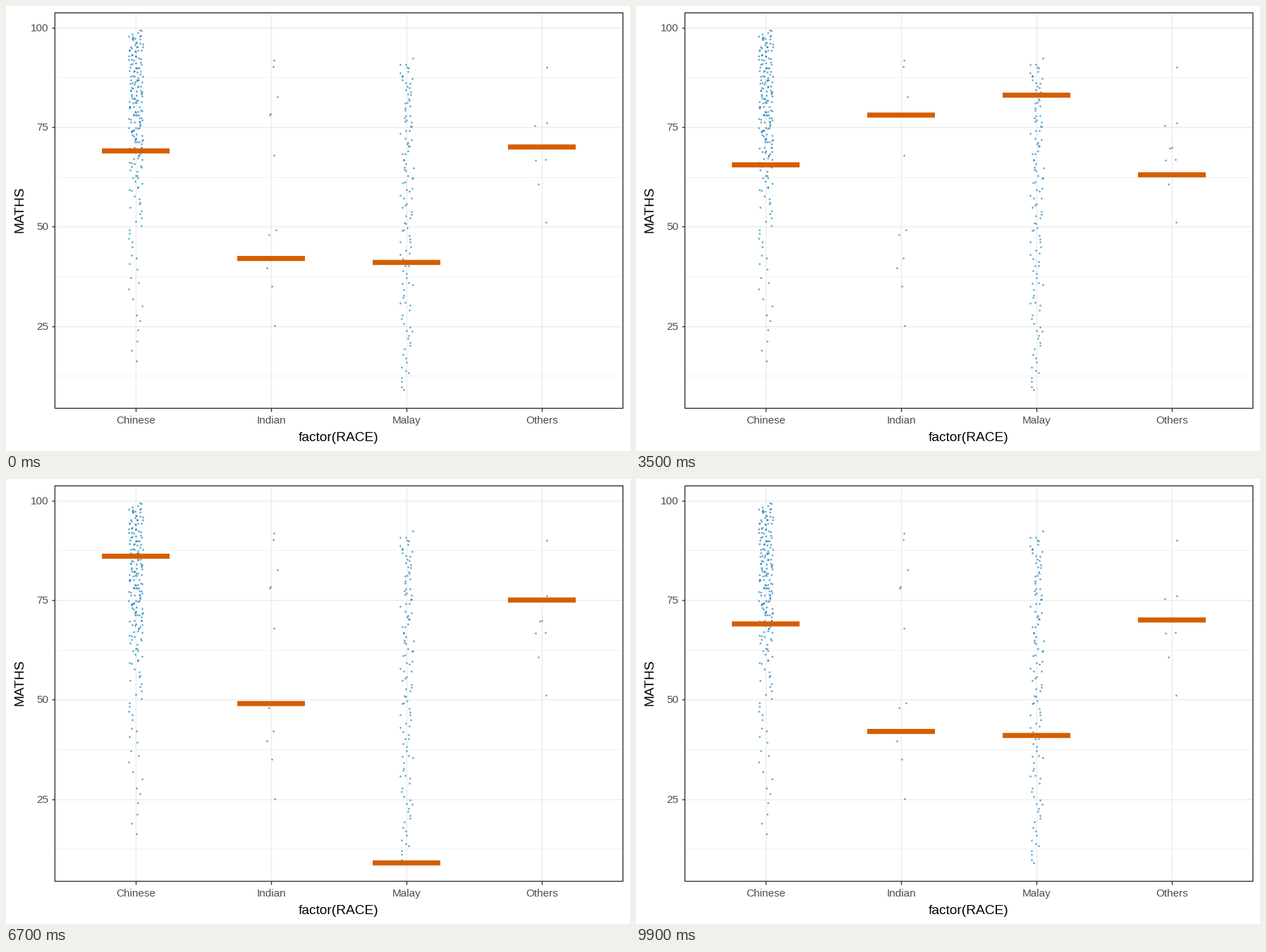
Animation of 885x632 px, one loop 10000 ms. Source, as a matplotlib script:

```python
import numpy as np
import matplotlib.pyplot as plt
from matplotlib.animation import FuncAnimation
from matplotlib.patches import Rectangle

W, H, DPI = 885, 632, 100
PX = 72 / DPI                      # points per pixel
LEFT, RIGHT, TOP, BOTTOM = 69.4, 875.0, 9.7, 571.4
DARK, GREY, GRID = "#333333", "#4D4D4D", "#EBEBEB"
BLUE, ORANGE = "#0072B2", "#D55E00"
BAR_W, BAR_H = 96, 7.2
LINE, SMALL, LARGE = 1.39, 15.28, 19.1
CENTERS = 184 + 192 * np.arange(4)

plt.rcParams["font.family"] = "Liberation Sans"

# Score shown by each group's bar in successive draws.
DRAWS = {
    "Chinese": [69, 76, 89, 70, 73, 69, 78, 70, 68, 63, 91, 79, 76,
                79, 91, 63, 85, 86, 91, 88, 66, 89, 75, 83, 83],
    "Indian": [42, 49, 49, 35, 49, 78, 49, 68, 78, 78, 83, 78, 92,
               49, 42, 48, 42, 49, 25, 68, 78, 35, 68, 49, 83],
    "Malay": [41, 58, 11, 58, 36, 32, 63, 43, 87, 79, 82, 87, 44,
              58, 75, 69, 58, 9, 58, 41, 87, 58, 58, 30, 58],
    "Others": [70, 70, 67, 70, 76, 70, 75, 75, 75, 51, 70, 90, 75,
               67, 67, 67, 70, 75, 67, 70, 70, 75, 67, 76, 67],
}
draws = np.array(list(DRAWS.values())).T


def score_y(score):
    return 30.5 + (100 - np.asarray(score)) * 5.656


def observations():
    """Whole scores per group: skewed quantile curves for the large groups."""
    q = np.linspace(0, 1, 205)
    chinese = np.round(99 - 40 * q - 43 * q ** 12)
    q = np.linspace(0, 1, 122)
    malay = np.round(92 - 62 * q - 21 * q ** 3)
    indian = [92, 90, 83, 78, 78, 68, 49, 48, 42, 40, 35, 25]
    others = [90, 76, 75, 70, 70, 67, 67, 61, 51]
    return chinese, indian, malay, others


def jittered(center, scores, rng):
    n = len(scores)
    x = center + rng.uniform(-10, 10, n)
    return x, score_y(scores + rng.uniform(-0.35, 0.35, n))


fig = plt.figure(figsize=(W / DPI, H / DPI), dpi=DPI, facecolor="white")
ax = fig.add_axes([0, 0, 1, 1])
ax.set(xlim=(0, W), ylim=(H, 0))
ax.axis("off")


def line(x0, y0, x1, y1, color, width=LINE):
    ax.plot([x0, x1], [y0, y1], color=color, lw=width * PX, zorder=1,
            solid_capstyle="butt")


def label(x, y, text, size, color, ha="center", **kw):
    ax.text(x, y, text, fontsize=size * PX, color=color, ha=ha,
            va="baseline", **kw)


for score in np.arange(12.5, 101, 12.5):
    y = score_y(score)
    if score % 25:
        line(LEFT, y, RIGHT, y, GRID, LINE / 2)
    elif score >= 25:
        line(LEFT, y, RIGHT, y, GRID)
        line(LEFT - 4.8, y, LEFT, y, DARK)
        label(60.3, y + 5.2, f"{score:.0f}", SMALL, GREY, ha="right")

rng = np.random.default_rng(7)
for x, name, scores in zip(CENTERS, DRAWS, observations()):
    line(x, TOP, x, BOTTOM, GRID)
    line(x, BOTTOM, x, BOTTOM + 4.8, DARK)
    label(x, 592.6, name, SMALL, GREY)
    ax.scatter(*jittered(x, scores, rng), s=(2.6 * PX) ** 2, color=BLUE,
               alpha=0.65, linewidths=0, zorder=3)

label(472, 618, "factor(RACE)", LARGE, "black")
label(24.8, 289.5, "MATHS", LARGE, "black", rotation=90,
      rotation_mode="anchor")

bars = [ax.add_patch(Rectangle((x - BAR_W / 2, 0), BAR_W, BAR_H, lw=0,
                               facecolor=ORANGE, zorder=4, snap=False))
        for x in CENTERS]
ax.add_patch(Rectangle((LEFT, TOP), RIGHT - LEFT, BOTTOM - TOP, fill=False,
                       edgecolor=DARK, lw=LINE * PX, zorder=5, snap=False))


def update(frame):
    # Three ticks of rest, then one halfway; the middle draw rests one less.
    draw, tick = divmod(frame + (frame >= 48), 4)
    now, following = draws[draw % 25], draws[(draw + 1) % 25]
    scores = (now + following) / 2 if tick == 3 else now
    for bar, y in zip(bars, score_y(scores)):
        bar.set_y(y - BAR_H / 2)
    return bars


anim = FuncAnimation(fig, update, frames=100, interval=100, repeat=True,
                     repeat_delay=0)
plt.show()
```
